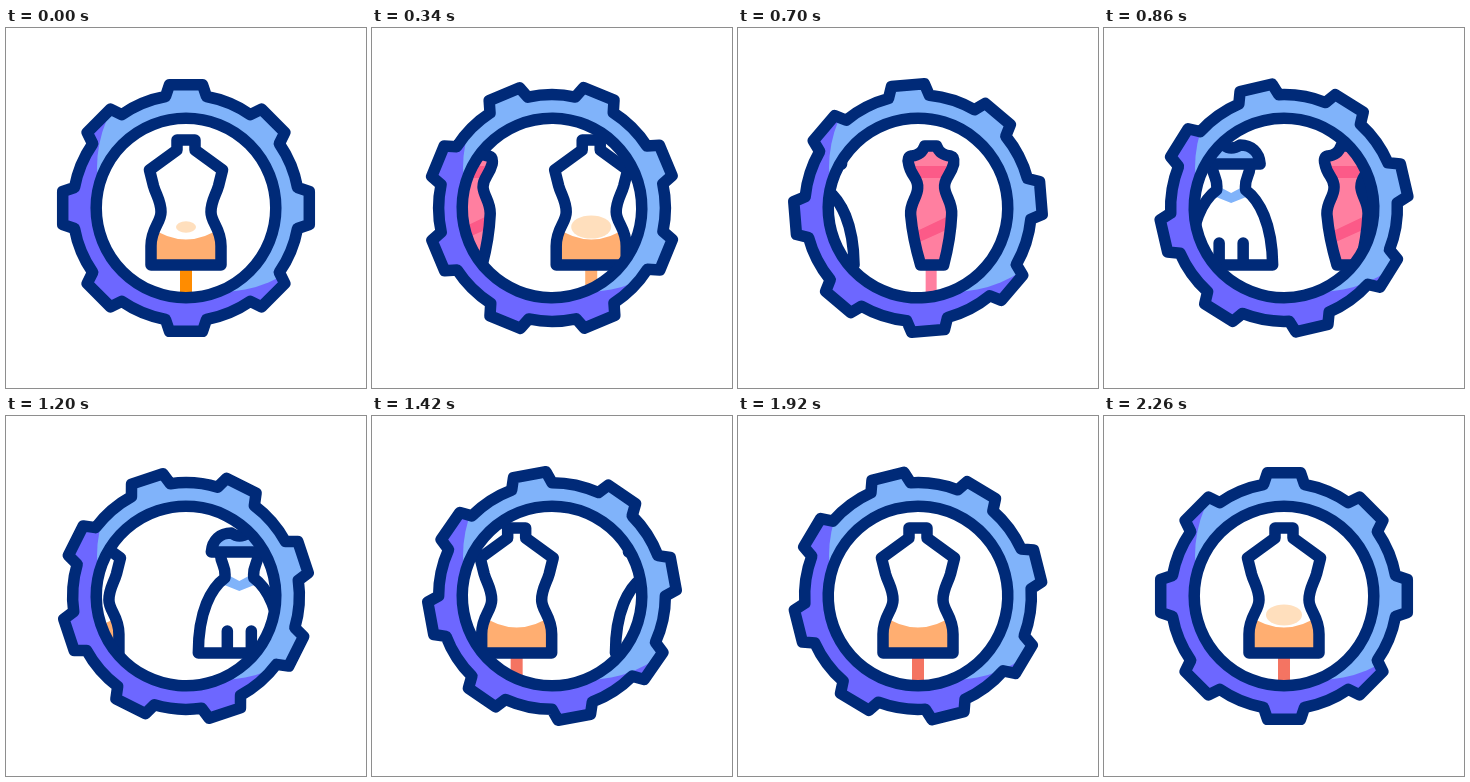
These frames come from a looping animation (360x360 px, 2400 ms). An HTML page:

```html
<!DOCTYPE html>
<html lang="en">
<head>
<meta charset="utf-8">
<title>Dress forms in a gear</title>
<style>
html, body { margin: 0; width: 100%; height: 100%; overflow: hidden; background: #fff; }
svg { display: block; width: 100vw; height: 100vh; }
.line { fill: none; stroke: #002a78; stroke-width: 11.5; stroke-linecap: round; stroke-linejoin: round; }
</style>
</head>
<body>
<svg viewBox="0 0 360 360">
  <defs>
    <path id="gear" fill-rule="evenodd" clip-rule="evenodd"/>
    <clipPath id="gearClip"><use id="clipGear" href="#gear"/></clipPath>
    <clipPath id="window"><circle cx="180" cy="180" r="90"/></clipPath>
    <path id="torso" d="M-9 112H9V122L36.5 142L32.5 158C30 167 25 173 25 184C25 195 35 200 35 218V237H-35V218C-35 200 -25 195 -25 184C-25 173 -30 167 -32.5 158L-36.5 142L-9 122Z"/>
    <clipPath id="torsoClip"><use href="#torso"/></clipPath>
    <path id="sheath" d="M-6 118H6Q9 127 20 128Q24 129 23 136C20 148 13 150 14 160C15 169 22 175 21 187Q20 210 13 237H-10Q-18 210 -20 187C-21 175 -13 169 -13 160C-12 150 -20 148 -22 136Q-24 129 -19 128Q-9 127 -6 118Z"/>
    <clipPath id="sheathClip"><use href="#sheath"/></clipPath>
    <path id="sleeves" d="M-28 136C-27 124 -19 117 -8 117Q0 123 9 117C20 117 28 124 29 136Z"/>
  </defs>

  <g clip-path="url(#window)">
    <g id="mannequin">
      <path id="pole" d="M-6 238H6V270H-6Z"/>
      <use href="#torso" fill="#fff"/>
      <g clip-path="url(#torsoClip)">
        <ellipse id="waist" cy="199" fill="#ffdfbd"/>
        <path d="M-40 196Q0 227 40 196V240H-40Z" fill="#ffae71"/>
      </g>
      <use href="#torso" class="line"/>
    </g>

    <g id="pink">
      <path d="M-5 238H6V270H-5Z" fill="#ff7fa0"/>
      <use href="#sheath" fill="#ff7fa0"/>
      <path d="M-24 138H24V150H-24ZM-20 206L20 187V200L-20 218Z" fill="#fc5a88" clip-path="url(#sheathClip)"/>
      <use href="#sheath" class="line"/>
    </g>

    <g id="gown">
      <path d="M-19 138C-18 150 -13 150 -14.5 162C-28 172 -41 195 -41 237H41.5C41 195 28 172 14.5 162C13 150 18 150 19 138Z" fill="#fff"/>
      <path d="M-15 157L0 165L15 157V169L0 175L-15 169Z" fill="#80b3fa"/>
      <path d="M-19 138C-18 150 -13 150 -14.5 162C-28 172 -41 195 -41 237H41.5C41 195 28 172 14.5 162C13 150 18 150 19 138M-12 215V237M12 215V237" class="line"/>
      <use href="#sleeves" fill="#80b3fa"/>
      <use href="#sleeves" class="line"/>
    </g>
  </g>

  <use id="gearFill" href="#gear" fill="#6d67ff"/>
  <g clip-path="url(#gearClip)"><circle cx="215" cy="140" r="124" fill="#80b3fa"/></g>
  <use id="gearLine" href="#gear" class="line"/>
</svg>

<script>
const LOOP = 2400, SPIN = 2190, SLIDE = 1700;
const $ = id => document.getElementById(id);
const clamp = x => Math.min(1, Math.max(0, x));
const smooth = x => x * x * (3 - 2 * x);
const sine = x => (1 - Math.cos(Math.PI * x)) / 2;

function gearPath() {
  const tooth = [[-20.5, -111.5], [-16.5, -123.3], [16.5, -123.3], [20.5, -111.5]];
  let d = '';
  for (let i = 0; i < 8; i++) {
    const a = i * Math.PI / 4, c = Math.cos(a), s = Math.sin(a);
    tooth.forEach(([x, y], j) => {
      const command = i + j === 0 ? 'M' : j ? 'L' : 'A113.4 113.4 0 0 1 ';
      d += command + (x * c - y * s).toFixed(2) + ' ' + (x * s + y * c).toFixed(2);
    });
  }
  return d + 'A113.4 113.4 0 0 1 -20.5 -111.5ZM-89.8 0A89.8 89.8 0 0 0 89.8 0A89.8 89.8 0 0 0 -89.8 0Z';
}

const moveTo = (id, x) => $(id).setAttribute('transform', `translate(${x} 0)`);

function draw(t) {
  const turn = clamp(t / SPIN);
  const angle = 180 * (smooth(turn) + sine(turn));
  for (const id of ['clipGear', 'gearFill', 'gearLine'])
    $(id).setAttribute('transform', `translate(180 180) rotate(${angle})`);

  const e = smooth(clamp(t / SLIDE));
  const leaving = e < 0.6;
  moveTo('mannequin', leaving ? 180 + 375 * e : 180 - 491 * (1 - e));
  moveTo('pink', 59.5 + 360 * e);
  moveTo('gown', 376 * e - 64.5);

  const waist = leaving ? 10 + 10 * clamp(t / 300) : 18 * clamp((t - 1950) / 300);
  $('waist').setAttribute('rx', waist);
  $('waist').setAttribute('ry', waist * 0.58);
  $('pole').setAttribute('fill', !leaving ? '#f47462' : t < 200 ? '#ff8c00' : '#ffae71');
}

$('gear').setAttribute('d', gearPath());
function frame() {
  draw(performance.now() % LOOP);
  requestAnimationFrame(frame);
}
frame();
</script>
</body>
</html>
```
